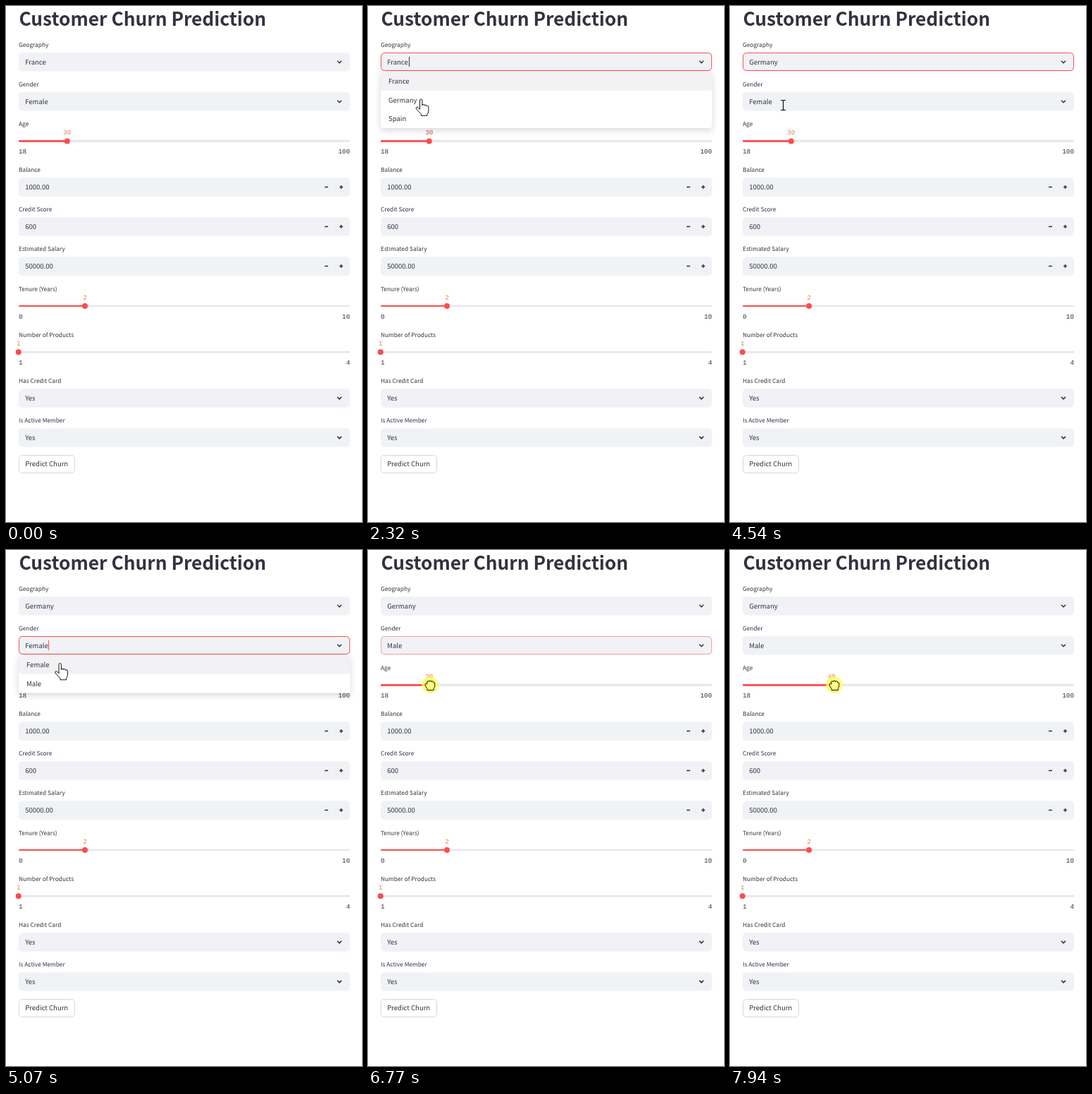
Recreate the animation shown at these times as an HTML page. Size 505x731 px, loop 8 s.

```html
<!DOCTYPE html>
<html lang="en">
<head>
<meta charset="utf-8">
<title>Churn form</title>
<style>
  html, body { margin: 0; width: 100%; height: 100%; overflow: hidden; background: #fff; }
  svg { display: block; }
  text { font: 9.52px 'Noto Sans CJK JP', 'Noto Sans CJK SC', 'Noto Sans CJK', sans-serif; fill: #31333f; white-space: pre; text-rendering: geometricPrecision; }
  .title { font-size: 26.28px; font-weight: 700; text-rendering: auto; }
  .label { font-size: 8.33px; }
  .mono { font: 9.3px 'Liberation Mono', monospace; }
  .mid { text-anchor: middle; }
  .end { text-anchor: end; }
  .icon { fill: none; stroke: #31333f; stroke-width: 1.5; }
  .focus { fill: none; stroke: #ff4b4b; }
  .menu { filter: drop-shadow(0 3px 5px rgba(0, 0, 0, .16)); }
  .cursor path { stroke: #111; stroke-width: 1; stroke-linejoin: round; fill: #fff; }
</style>
</head>
<body>
<svg id="stage" width="505" height="731" viewBox="0 0 505 731"></svg>
<script>
const LOOP = 8000, LEFT = 18, WIDTH = 470, ROW = 26.6;
const stage = document.getElementById('stage');
const $ = id => document.getElementById(id);

const text = (x, y, s, cls = '', id = '') =>
  `<text x="${x}" y="${Math.round(y)}" class="${cls}" id="${id}">${s}</text>`;
const label = (y, s) => text(LEFT, y + 3.2, s, 'label');
const box = y => `<rect x="${LEFT}" y="${y - 13.3}" width="${WIDTH}" height="${ROW}" rx="5" fill="#f0f2f6"/>`;

const select = (y, name, value, id = '') => label(y - 24.3, name) + box(y) +
  text(27.2, y + 3.7, value, '', id) +
  `<path class="icon" d="M470 ${y - 1.6}l3 3l3-3"/>`;

const number = (y, name, value) => label(y - 24.4, name) + box(y) +
  text(27.2, y + 3.7, value) +
  `<path class="icon" d="M452 ${y}h5M473 ${y}h5M475.5 ${y - 2.5}v5"/>`;

const slider = (id, y, name, min, max, x, value, h = 2.7) => label(y - 24.5, name) +
  `<rect x="${LEFT}" y="${y - h / 2}" width="${WIDTH}" height="${h}" rx="1" fill="#e5e6ee"/>
   <rect id="${id}Fill" x="${LEFT}" y="${y - h / 2}" width="${x - LEFT}" height="${h}" rx="1" fill="#ff4b4b"/>
   <circle id="${id}Thumb" cx="${x}" cy="${y}" r="4" fill="#ff4b4b"/>` +
  text(x, y - 9, value, 'mono mid', id + 'Value') +
  text(LEFT, y + 17.8, min, 'mono') + text(LEFT + WIDTH, y + 17.8, max, 'mono end');

const focus = (id, y) =>
  `<rect id="${id}" class="focus" x="18.5" y="${y}" width="469" height="25" rx="5"/>`;

const menu = (id, y, items) => `<g id="${id}" class="menu">
  <rect x="${LEFT}" y="${y}" width="${WIDTH}" height="${ROW * items.length}" rx="4" fill="#fff"/>
  <rect x="${LEFT}" y="${y}" width="${WIDTH}" height="${ROW}" rx="4" fill="#f2f2f4"/>` +
  items.map((s, i) => text(29, y + ROW * (i + .5) + 3.7, s)).join('') + '</g>';

stage.innerHTML =
  text(18.4, 28, 'Customer Churn Prediction', 'title') +
  select(79.3, 'Geography', 'France', 'geo') +
  select(135.3, 'Gender', 'Female', 'gender') +
  slider('age', 191.4, 'Age', 18, 100, 86.8, 30) +
  number(256.6, 'Balance', '1000.00') +
  number(312.6, 'Credit Score', '600') +
  number(368.6, 'Estimated Salary', '50000.00') +
  slider('tenure', 425, 'Tenure (Years)', 0, 10, 112, 2, 2) +
  slider('products', 490.3, 'Number of Products', 1, 4, 17.7, 1) +
  select(555.5, 'Has Credit Card', 'Yes') +
  select(611.5, 'Is Active Member', 'Yes') +
  `<rect x="18.5" y="636.5" width="79" height="25" rx="5" fill="#fff" stroke="#d6d6da"/>` +
  text(27.2, 652.3, 'Predict Churn') +
  focus('geoFocus', 66.5) + focus('genderFocus', 122.5) +
  '<rect id="caret" width="1" height="14"/>' +
  menu('geoMenu', 93.2, ['France', 'Germany', 'Spain']) +
  menu('genderMenu', 149.2, ['Female', 'Male']) +
  `<g id="cursor" class="cursor">
    <circle id="press" r="11.8" fill="#ffff55" opacity=".8"/>
    <path id="arrow" d="M0 0v16l4-3.6l2.6 6l2.4-1l-2.6-6h5.2z"/>
    <path id="beam" style="fill:none;stroke-width:1.2" d="M-3.5 -7h2.5q1 0 1 1q0-1 1-1h2.5M0 -6v12M-3.5 7h2.5q1 0 1-1q0 1 1 1h2.5"/>
    <path id="hand" d="M-2 1q0-2 1.7-2t1.7 2v7q0-1.6 1.6-1.6t1.7 1.8q.2-1.3 1.6-1.1t1.5 1.9q.2-1 1.4-.7t1.2 2v5q0 3-2 5v2h-8.4v-2l-6.6-7q-1.6-2.2 0-3t4.6 3z"/>
    <path id="fist" style="fill:#ffff8c" d="M-4 7.5v-2l-2-3q-1.7-2.8-.5-4q1-.8 2.3.6v-3q.2-1.8 1.6-1.6q1.2.2 1.3 1.4q.1-2 1.5-2t1.6 2q.3-1.4 1.6-1.2t1.3 2q1.8-.8 2 1.4v3.4q0 2-1.5 4v2z"/>
  </g>`;

// Pointer path: time, x, y
const path = [
  [260, 440, 680], [960, 98.5, 79.5], [1630, 98.5, 79.5], [2050, 75.5, 133], [4270, 75.5, 133],
  [4340, 75.5, 140.5], [4900, 75.5, 140.5], [5280, 79, 190], [6360, 79, 190], [6560, 92, 191],
  [6700, 88, 191], [6800, 88, 191], [7530, 129, 191], [7940, 148, 191], [8000, 148, 191]
];
const DRAG = 6740;
const presses = [[1090, 1220], [2780, 2900], [4600, 4740], [5350, 5480], [DRAG, LOOP]];
// Caret: start, end, x, y
const carets = [
  [1250, 2890, 58, 72], [2920, 4600, 69, 72], [4740, 5480, 60, 128], [5550, DRAG, 50, 128]
];

const within = (t, a, b) => t >= a && t < b;
const ramp = (t, a, b) => Math.min(1, Math.max(0, (t - a) / (b - a)));
const show = (id, on) => $(id).style.display = on ? '' : 'none';
const fade = (id, alpha) => { $(id).style.opacity = alpha; show(id, alpha > 0); };
const set = (id, attrs) => { for (const k in attrs) $(id).setAttribute(k, attrs[k]); };

function pointer(t) {
  let i = 1;
  while (i < path.length - 1 && path[i][0] <= t) i++;
  const [a, x, y] = path[i - 1], [b, x2, y2] = path[i];
  let k = ramp(t, a, b);
  if (t < DRAG) k = k * k * (3 - 2 * k);
  return [x + (x2 - x) * k, y + (y2 - y) * k];
}

function pickShape(t, y) {
  if (t >= DRAG) return 'fist';
  if (t < 960 && y > 93) return 'arrow';
  if (t < 2900 && y > 93 || t > 4740 && y > 149) return 'hand';
  return 'beam';
}

function draw(t) {
  $('geo').textContent = t < 2880 ? 'France' : 'Germany';
  $('gender').textContent = t < 5460 ? 'Female' : 'Male';

  fade('geoFocus', ramp(t, 1100, 1370) - ramp(t, 4600, 4800));
  fade('genderFocus', ramp(t, 4600, 4800) - ramp(t, 6700, 6840));
  fade('geoMenu', ramp(t, 1210, 1300) - ramp(t, 2850, 2920));
  fade('genderMenu', ramp(t, 4730, 4820) - ramp(t, 5480, 5550));

  const caret = carets.find(([a, b]) => within(t, a, b) && (t - a) % 1070 < 535);
  show('caret', caret);
  if (caret) set('caret', { x: caret[2], y: caret[3], fill: t < 4600 ? '#31333f' : '#ff4b4b' });

  const [x, y] = pointer(t), shape = pickShape(t, y);
  show('cursor', t >= 260);
  set('cursor', { transform: `translate(${x} ${y})` });
  for (const id of ['arrow', 'beam', 'hand', 'fist']) show(id, id === shape);
  show('press', presses.some(([a, b]) => within(t, a, b)));

  const age = t < DRAG ? 30 : Math.round(18 + (x - 1.2 - LEFT) / WIDTH * 82);
  const ageX = LEFT + (age - 18) / 82 * WIDTH;
  set('ageFill', { width: ageX - LEFT });
  set('ageThumb', { cx: ageX });
  set('ageValue', { x: ageX });
  $('ageValue').textContent = age;

  const dark = within(t, 3200, 3260) || within(t, 5820, 5950);
  for (const id of ['age', 'tenure', 'products']) {
    const red = id === 'age' && within(t, 1220, 2900);
    $(id + 'Value').style.fill = dark ? '#8f3a45' : red ? '#d4544c' : '#e0834a';
  }
}

const start = performance.now();
function tick() {
  draw((performance.now() - start) % LOOP);
  requestAnimationFrame(tick);
}
tick();
</script>
</body>
</html>
```
